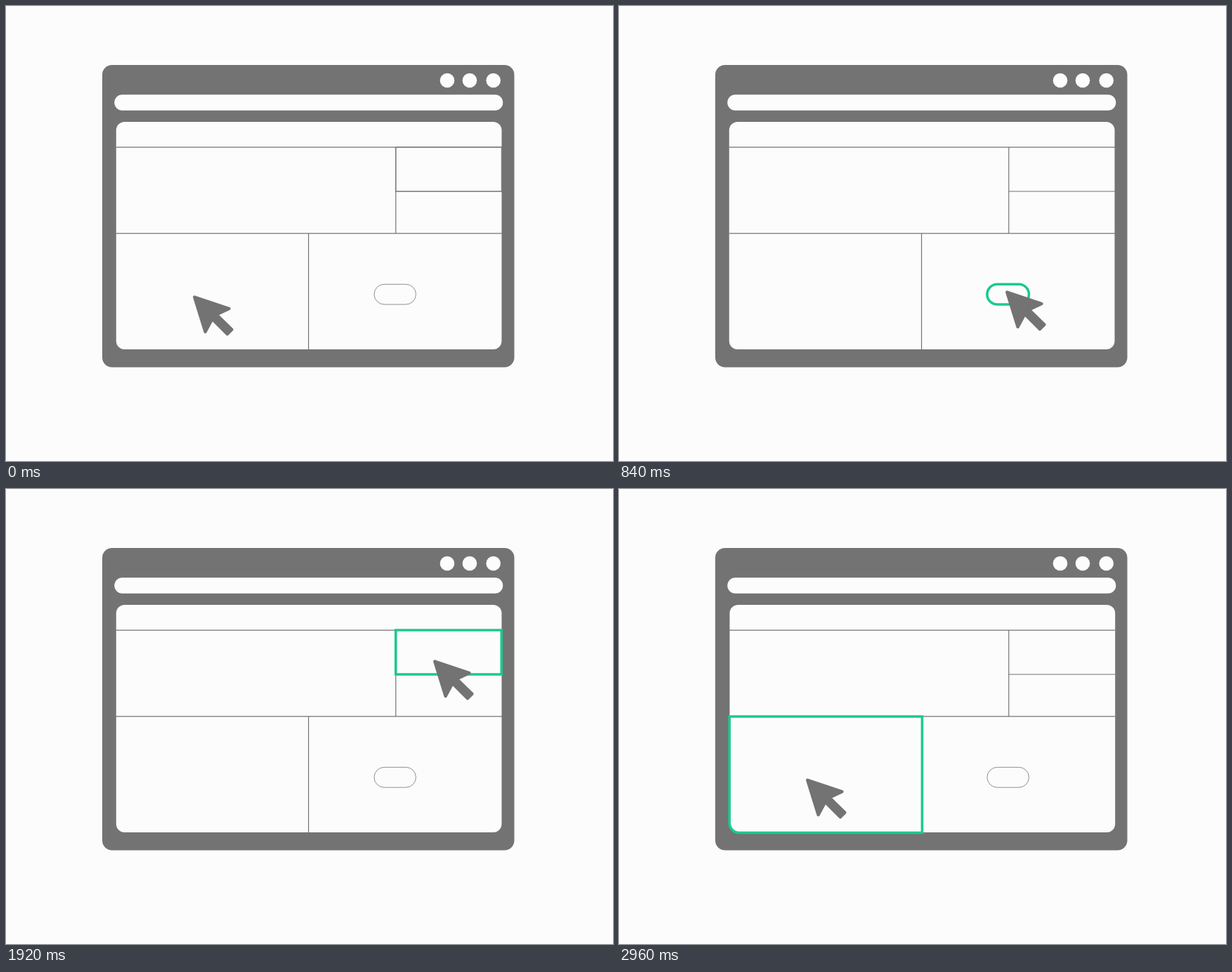
Write an HTML page with a canvas that moves like this. It is 864 by 648 pixels and loops after 3.04 s.

```html
<!DOCTYPE html>
<html lang="en">
<head>
<meta charset="utf-8">
<title>Cursor clicks</title>
<style>
  html, body { margin: 0; width: 100%; height: 100%; overflow: hidden; background: #fcfcfc; }
  canvas { display: block; width: 864px; height: 648px; }
</style>
</head>
<body>
<canvas id="stage" width="864" height="648"></canvas>
<script>
const ctx = document.getElementById('stage').getContext('2d');
const LOOP = 3040, STEP = 40;
const GRAY = '#737373', PAPER = '#fcfcfc', GREEN = '#1bc98e';

// Cursor tip: time, x, y
const path = [
  [0, 267, 413], [520, 551, 406],
  [1120, 551, 406], [1560, 609, 244],
  [2120, 609, 244], [2560, 267, 413], [LOOP, 267, 413]
];

// Areas that light up under the cursor; radii as top-left, top-right, bottom-right, bottom-left
const areas = [
  { box: [524, 396.3, 59.5, 28.7], radii: 14.3, from: 0 },
  { box: [554.8, 201, 150.5, 63], radii: 0, from: 0 },
  { box: [157.2, 324, 274.3, 165.5], radii: [0, 0, 0, 14], from: 2120 }
];

const clicks = [
  { at: 560, span: 280, x: 559, y: 415 },
  { at: 1680, span: 240, x: 613, y: 251 },
  { at: 2680, span: 280, x: 271, y: 421 }
];

// Inner end of each ray and its direction
const D = Math.SQRT1_2;
const rays = [
  [-25, 0, -1, 0], [-14.5, -15.5, -D, -D], [0.5, -26.5, 0, -1],
  [18.5, -18, D, -D], [-20, 14.5, -D, D]
];

const arrow = [
  [1.3, 1.5], [50.5, 18], [32.4, 26.4], [54.5, 47.8],
  [48, 54.3], [26.5, 32.6], [16.7, 51]
];

function fillBox(x, y, w, h, r, color) {
  ctx.fillStyle = color;
  ctx.beginPath();
  ctx.roundRect(x, y, w, h, r);
  ctx.fill();
}

function strokeBox(area, color, width) {
  ctx.strokeStyle = color;
  ctx.lineWidth = width;
  ctx.beginPath();
  ctx.roundRect(...area.box, area.radii);
  ctx.stroke();
}

function line(x1, y1, x2, y2, width) {
  ctx.strokeStyle = GRAY;
  ctx.lineWidth = width;
  ctx.beginPath();
  ctx.moveTo(x1, y1);
  ctx.lineTo(x2, y2);
  ctx.stroke();
}

function tipAt(t) {
  const i = path.findIndex(p => p[0] > t);
  const [t0, x0, y0] = path[i - 1], [t1, x1, y1] = path[i];
  const k = (t - t0) / (t1 - t0);
  return [x0 + (x1 - x0) * k, y0 + (y1 - y0) * k];
}

function hovered(t, [px, py]) {
  return areas.find(({ box: [x, y, w, h], from }) =>
    t >= from && px > x && px < x + w && py > y && py < y + h);
}

function drawWindow(active) {
  const [pill, cell, corner] = areas;
  const dx = active === corner ? 0.7 : 0;
  fillBox(137, 84, 586.5, 430.5, 14, GRAY);
  for (const x of [628, 660, 693.7]) fillBox(x - 10.3, 95.7, 20.6, 20.6, 10.3, PAPER);
  fillBox(154.3, 126.2, 553, 22.6, 11.3, PAPER);
  fillBox(156.8 + dx, 165, 548.7, 324, 12, PAPER);

  line(157, 201.2, 706, 201.2, 1.2);
  line(157, 323.8, 706, 323.8, 1.2);
  line(554.8, 201, 554.8, 324, 1.2);
  line(555, 264, 706, 264, 1.2);
  line(430.6, 324, 430.6, 489, 1.2);
  if (!active) strokeBox(cell, GRAY, 1);
  if (active !== pill) strokeBox(pill, GRAY, 0.8);
  if (active) strokeBox(active, GREEN, 3.6);
}

function drawRays(t) {
  const c = clicks.find(c => t >= c.at && t < c.at + c.span);
  if (!c) return;
  const shift = (t - c.at - STEP) / (c.span - 2 * STEP) * 13;
  ctx.lineCap = 'round';
  for (const [x, y, ux, uy] of rays) {
    const at = d => [c.x + x + ux * d, c.y + y + uy * d];
    line(...at(shift), ...at(shift + 11), 3.8);
  }
  ctx.lineCap = 'butt';
}

function drawCursor([x, y]) {
  ctx.fillStyle = ctx.strokeStyle = GRAY;
  ctx.lineWidth = 4.4;
  ctx.lineJoin = 'round';
  ctx.beginPath();
  for (const [ax, ay] of arrow) ctx.lineTo(x + ax, y + ay);
  ctx.closePath();
  ctx.fill();
  ctx.stroke();
  ctx.lineJoin = 'miter';
}

function draw(t) {
  const tip = tipAt(t);
  ctx.fillStyle = PAPER;
  ctx.fillRect(0, 0, 864, 648);
  drawWindow(hovered(t, tip));
  drawRays(t);
  drawCursor(tip);
}

const start = performance.now();
function tick() {
  const t = (performance.now() - start) % LOOP;
  draw(Math.floor(t / STEP) * STEP);
  requestAnimationFrame(tick);
}
tick();
</script>
</body>
</html>
```
